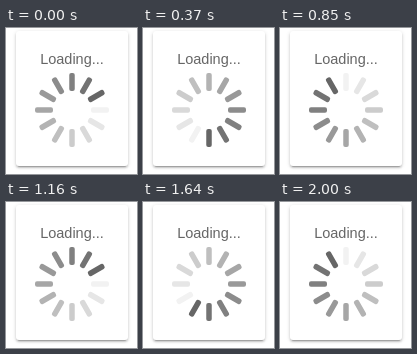
An HTML page for the animation above (2040 ms loop, 131x146 px).

```html
<!DOCTYPE html>
<html lang="en">
<meta charset="utf-8">
<title>Loading</title>
<style>
  html, body { margin: 0; width: 131px; height: 146px; overflow: hidden; background: #fff; }
  .card {
    position: absolute; left: 10px; top: 3px; width: 112px; height: 135px;
    border-radius: 3px; background: #fff;
    box-shadow: 0 2px 2px rgba(0, 0, 0, .16), 0 3px 1px -2px rgba(0, 0, 0, .2),
      0 1px 4px rgba(0, 0, 0, .14);
  }
  svg { position: absolute; left: 0; top: 0; }
  text { font: 14.5px "Liberation Sans", Arial, sans-serif; fill: #666; }
</style>
<div class="card"></div>
<svg width="131" height="146">
  <text x="66" y="36" text-anchor="middle">Loading...</text>
  <g id="wheel"></g>
</svg>
<script>
  const LOOP = 2040, TICK = 95, LEAD = 12; // ms
  const SPOKES = 12, TURN = 360 / SPOKES;
  const wheel = document.getElementById('wheel');

  // Spokes fade from the dark head backwards around the wheel
  for (let i = 0; i < SPOKES; i++) {
    const grey = Math.round(102 + i * 12.75);
    wheel.innerHTML += `<rect x="-2.75" y="-37" width="5.5" height="18" rx="2"
      fill="rgb(${grey},${grey},${grey})" transform="rotate(${60 - TURN * i})"/>`;
  }

  function draw() {
    const t = performance.now() % LOOP;
    const step = Math.floor((t + LEAD) / TICK);
    wheel.setAttribute('transform', `translate(66 82) rotate(${TURN * step})`);
    requestAnimationFrame(draw);
  }
  draw();
</script>
</html>
```
